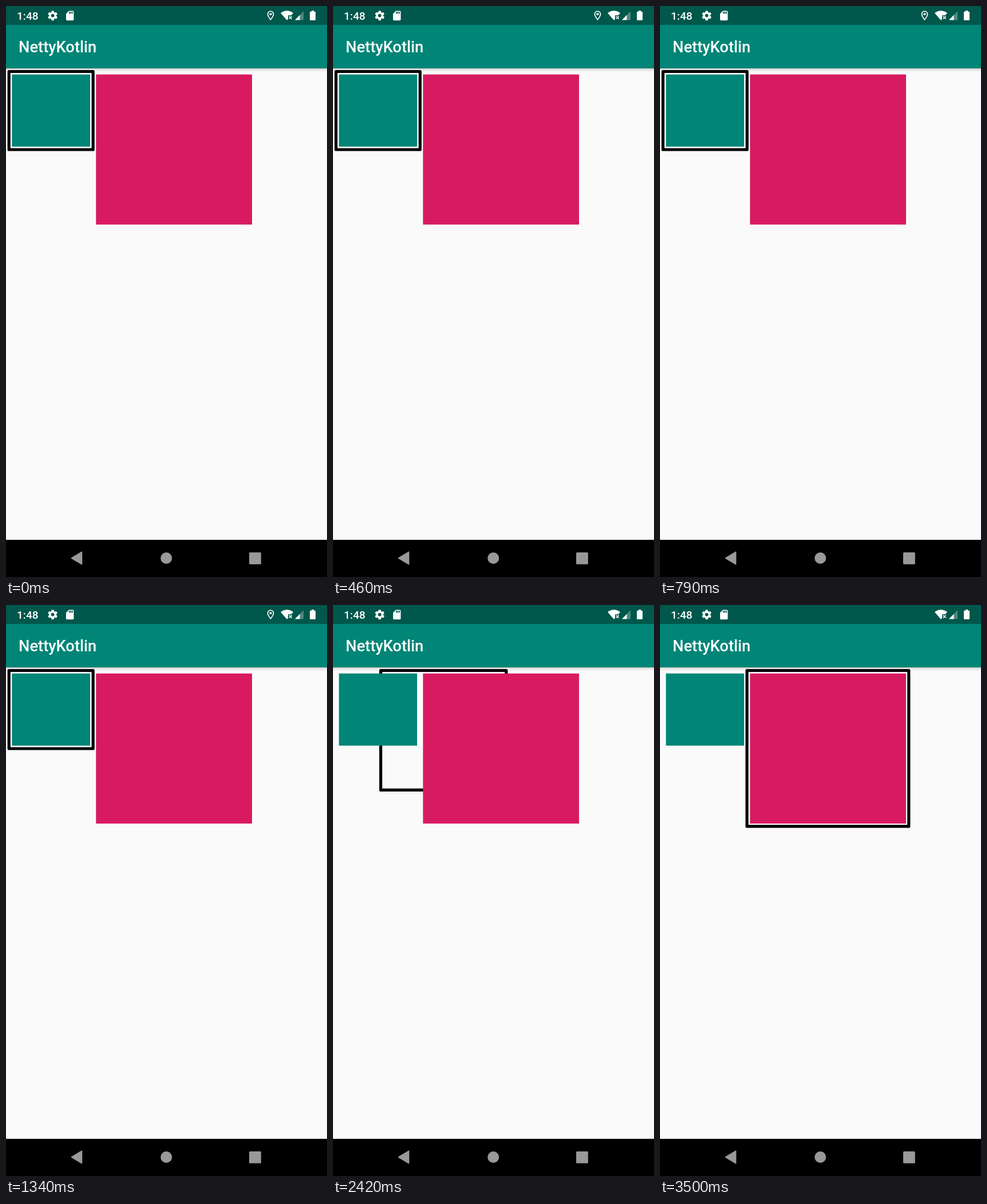
Write an HTML page that moves like this. It is 561x998 px and loops after 3540 ms.

```html
<!DOCTYPE html>
<html lang="en">
<head>
<meta charset="utf-8">
<title>Focus frame</title>
<style>
  html, body { margin: 0; width: 100%; height: 100%; overflow: hidden; background: #fafafa; }
  svg { display: block; width: 100%; height: 100%; }
  text { font-family: Roboto, sans-serif; font-weight: 500; fill: #fff; }
</style>
</head>
<body>
<svg viewBox="0 0 561 998">
  <defs>
    <linearGradient id="shadow" x2="0" y2="1">
      <stop offset="0" stop-color="#000" stop-opacity=".2"/>
      <stop offset=".4" stop-color="#000" stop-opacity=".07"/>
      <stop offset="1" stop-color="#000" stop-opacity="0"/>
    </linearGradient>
  </defs>

  <rect width="561" height="998" fill="#fafafa"/>
  <rect y="109" width="561" height="7" fill="url(#shadow)"/>

  <rect id="frame" fill="none" stroke="#000" stroke-width="5.2" stroke-linejoin="round"/>
  <rect x="10.4" y="119.7" width="136.6" height="126.1" fill="#008577"/>
  <rect x="157.3" y="119.7" width="272.7" height="262.3" fill="#d81b60"/>

  <rect y="33" width="561" height="76" fill="#008577"/>
  <text x="22" y="81.3" font-size="27.3">NettyKotlin</text>

  <!-- Status bar -->
  <rect width="561" height="33" fill="#00574b"/>
  <text x="19" y="24" font-size="19.1">1:48</text>
  <g fill="#fff">
    <path transform="translate(71.5 6.7) scale(.84)" d="M19.43 12.98c.04-.32.07-.64.07-.98s-.03-.66-.07-.98l2.11-1.65c.19-.15.24-.42.12-.64l-2-3.46c-.12-.22-.39-.3-.61-.22l-2.49 1c-.52-.4-1.08-.73-1.69-.98l-.38-2.65C14.46 2.18 14.25 2 14 2h-4c-.25 0-.46.18-.49.42l-.38 2.65c-.61.25-1.17.59-1.69.98l-2.49-1c-.23-.09-.49 0-.61.22l-2 3.46c-.13.22-.07.49.12.64l2.11 1.65c-.04.32-.07.65-.07.98s.03.66.07.98l-2.11 1.65c-.19.15-.24.42-.12.64l2 3.46c.12.22.39.3.61.22l2.49-1c.52.4 1.08.73 1.69.98l.38 2.65c.03.24.24.42.49.42h4c.25 0 .46-.18.49-.42l.38-2.65c.61-.25 1.17-.59 1.69-.98l2.49 1c.23.09.49 0 .61-.22l2-3.46c.12-.22.07-.49-.12-.64l-2.11-1.65zM12 15.5c-1.93 0-3.5-1.57-3.5-3.5s1.57-3.5 3.5-3.5 3.5 1.57 3.5 3.5-1.57 3.5-3.5 3.5z"/>
    <path transform="translate(101.6 6.7) scale(.84)" d="M18 2h-8L4 8v12c0 1.1.9 2 2 2h12c1.1 0 2-.9 2-2V4c0-1.1-.9-2-2-2zm-6 6h-2V4h2v4zm3 0h-2V4h2v4zm3 0h-2V4h2v4z"/>
    <g id="location" transform="translate(452.4 6.7) scale(.84)">
      <path d="M12 2C8.1 2 5 5.1 5 9c0 5.2 7 13 7 13s7-7.8 7-13c0-3.9-3.1-7-7-7zM7 9c0-2.8 2.2-5 5-5s5 2.2 5 5c0 2.9-2.9 7.2-5 9.9C9.9 16.2 7 11.9 7 9z"/>
      <circle cx="12" cy="9" r="2.5"/>
    </g>
    <path d="M480 12.2Q491 4.2 502 12.2L498.6 16.2H493V22.6L491 25Z"/>
    <path d="M494.8 17.8l4.8 4.8m0-4.8l-4.8 4.8" stroke="#fff" stroke-width="1.5"/>
    <path d="M505 24.5L520 9V24.5Z" opacity=".3"/>
    <path d="M505 24.5L513.5 15.7V24.5Z"/>
    <path d="M534 8h4v1.8h1.8q1.2 0 1.2 1.2v12.8q0 1.2-1.2 1.2h-7.6q-1.2 0-1.2-1.2V11q0-1.2 1.2-1.2H534z"/>
  </g>

  <!-- Navigation bar -->
  <rect y="933" width="561" height="65" fill="#000"/>
  <g fill="#999">
    <path d="M114.5 965L132.5 954.2V975.8Z" stroke="#999" stroke-width="1.6" stroke-linejoin="round"/>
    <circle cx="280.2" cy="965" r="10"/>
    <rect x="425" y="955" width="20.8" height="20.8" rx="1.5"/>
  </g>
</svg>
<script>
  const LOOP = 3540, MOVE_START = 1863, MOVE_TIME = 1071, LOCATION_OFF = 2200;
  const from = { x: 5.2, y: 114.5, width: 147, height: 136.5 };
  const to = { x: 152, y: 114.5, width: 282.8, height: 272.4 };
  const frame = document.getElementById('frame');
  const locationIcon = document.getElementById('location');

  const easeInOut = x => (1 - Math.cos(Math.PI * x)) / 2;

  function draw() {
    const t = performance.now() % LOOP;
    const p = easeInOut(Math.min(1, Math.max(0, (t - MOVE_START) / MOVE_TIME)));
    for (const key in from) frame.setAttribute(key, from[key] + (to[key] - from[key]) * p);
    locationIcon.setAttribute('visibility', t < LOCATION_OFF ? 'visible' : 'hidden');
    requestAnimationFrame(draw);
  }
  draw();
</script>
</body>
</html>
```
